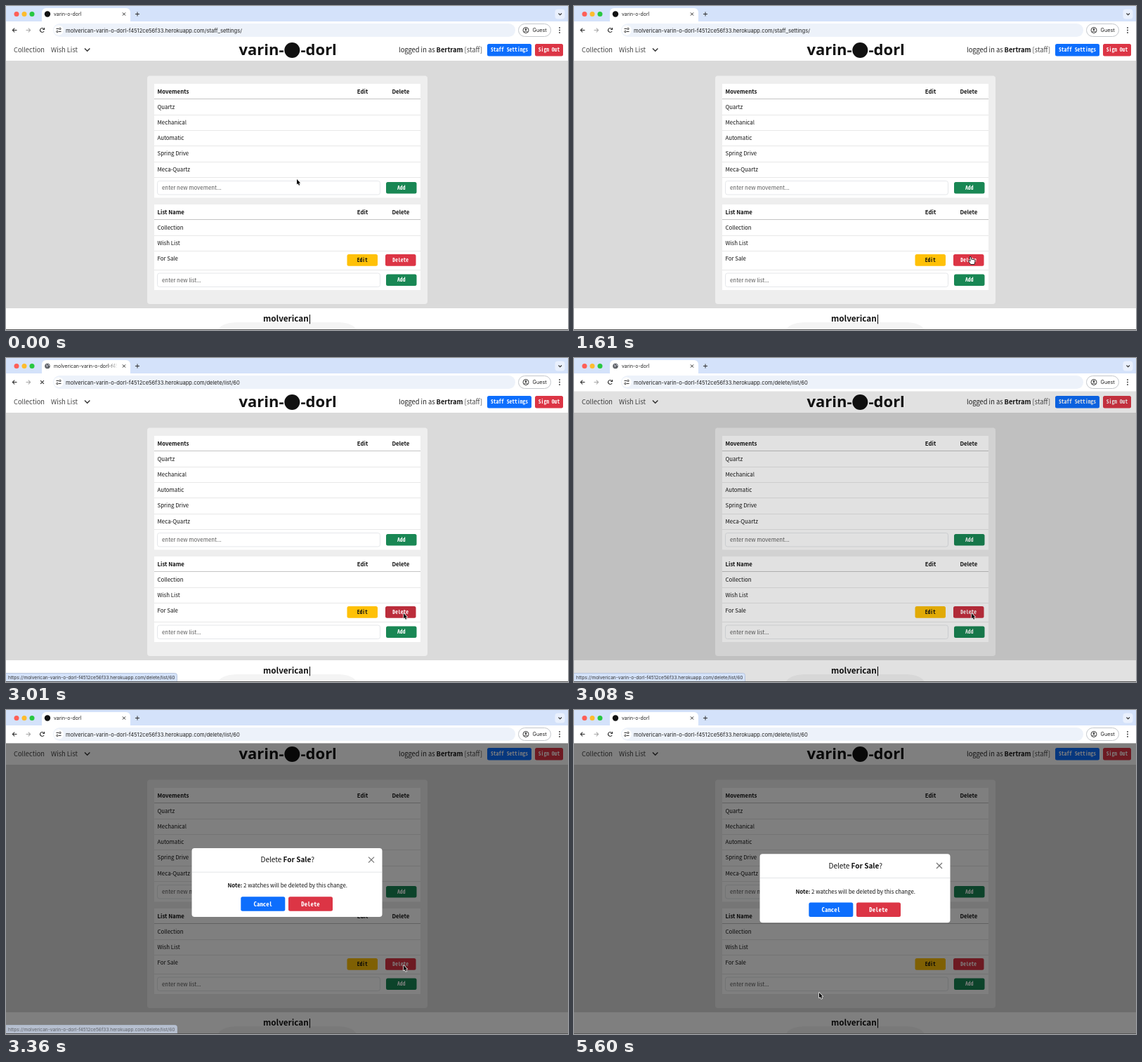
An HTML page with a canvas that plays this animation: 800x462 px, repeating every 6020 ms.

```html
<!DOCTYPE html>
<html lang="en">
<head>
<meta charset="utf-8">
<title>varin-o-dorl</title>
<style>
html, body { margin: 0; width: 100%; height: 100%; overflow: hidden; background: #fff; }
canvas { display: block; width: 800px; height: 462px; }
</style>
</head>
<body>
<canvas id="stage" width="800" height="462"></canvas>
<script>
const ctx = document.getElementById('stage').getContext('2d');
const LOOP = 6020, STEP = 70;
const SANS = '"Noto Sans CJK JP", "Noto Sans CJK SC", "Noto Sans CJK", "Open Sans", sans-serif';
const MONO = '"Noto Sans Mono CJK JP", "Noto Sans Mono CJK SC", "Noto Sans Mono", monospace';
const UI = 'Inter, Roboto, sans-serif';
const USER = 'molverican', SITE = 'varin-o-dorl';
const HOST = `${USER}-${SITE}-f4512ce56f33.herokuapp.com`;
const BLUE = '#0d6efd', RED = '#dc3545', GREEN = '#198754', YELLOW = '#ffc107';

// Moments of the story, in ms
const HOVER = 1540, STATUS_ON = 2030, CLICK = 2170, COMMIT = 2940, LOADED = 3045,
      MODAL = 3210, STATUS_OFF = 3290;

// Pointer way-points: time, x, y
const PATH = [[840, 414, 247], [1500, 563, 356], [1610, 565, 358], [1890, 566, 364],
  [4130, 566, 364], [5320, 342, 403], [5600, 349, 403]];

const clamp = v => Math.max(0, Math.min(1, v));
const ramp = (t, start, length) => clamp((t - start) / length);
const mix = (a, b, p) => a + (b - a) * p;
const smooth = p => p * p * (3 - 2 * p);
const easeOut = p => 1 - Math.pow(1 - p, 1.7);

function rect(x, y, w, h, fill) {
  ctx.fillStyle = fill;
  ctx.fillRect(x, y, w, h);
}

function round(x, y, w, h, r, fill, stroke) {
  ctx.beginPath();
  ctx.roundRect(x, y, w, h, r);
  if (fill) { ctx.fillStyle = fill; ctx.fill(); }
  if (stroke) { ctx.strokeStyle = stroke; ctx.lineWidth = 1; ctx.stroke(); }
}

function disc(x, y, r, fill) {
  ctx.beginPath();
  ctx.arc(x, y, r, 0, Math.PI * 2);
  ctx.fillStyle = fill;
  ctx.fill();
}

function line(points, color, width = 1) {
  ctx.beginPath();
  points.forEach(([x, y]) => ctx.lineTo(x, y));
  ctx.strokeStyle = color;
  ctx.lineWidth = width;
  ctx.stroke();
}

function arc(x, y, r, from, to, color, width) {
  ctx.beginPath();
  ctx.arc(x, y, r, from, to);
  ctx.strokeStyle = color;
  ctx.lineWidth = width;
  ctx.stroke();
}

function cross(x, y, r, color, width) {
  line([[x - r, y - r], [x + r, y + r]], color, width);
  line([[x + r, y - r], [x - r, y + r]], color, width);
}

function text(str, x, y, size, { font = SANS, weight = 400, color = '#111', align = 'left' } = {}) {
  ctx.font = `${weight} ${size}px ${font}`;
  ctx.textAlign = align;
  ctx.fillStyle = color;
  ctx.fillText(str, x, y);
  return x + ctx.measureText(str).width;
}

function button(label, x, y, w, h, fill, color = '#fff', size = 7.6) {
  round(x, y, w, h, 2.5, fill);
  text(label, x + w / 2, y + h / 2 + size * 0.35, size,
    { font: MONO, weight: 700, color, align: 'center' });
}

function drawTabs(t) {
  const loading = t >= CLICK && t < LOADED, committed = t >= COMMIT && t < LOADED;
  rect(0, 0, 800, 24, '#d4e2fa');
  ['#ff5f57', '#febc2e', '#28c840'].forEach((c, i) => disc(15 + i * 11, 11.5, 3.5, c));
  round(51, 3, 126, 24, 6, '#fff');

  if (loading && !committed) {
    const a = t / 150;
    arc(59, 11.5, 3.5, a, a + 4, '#1a73e8', 1.2);
  } else if (t >= COMMIT && t < MODAL) {
    disc(59, 11.5, 3.8, '#5f6368');
    line([[57, 9.5], [59, 11], [58, 13]], '#dde', 1);
    line([[60, 9], [62, 11]], '#dde', 1);
  } else {
    disc(59, 11.5, 4.2, '#111');
  }

  ctx.save();
  ctx.beginPath();
  ctx.rect(66, 4, 92, 16);
  ctx.clip();
  text(committed ? HOST : SITE, 68, 14, 6.9, { font: UI, color: '#222' });
  ctx.restore();
  if (committed) {
    const fade = ctx.createLinearGradient(146, 0, 159, 0);
    fade.addColorStop(0, '#fff0');
    fade.addColorStop(1, '#fff');
    rect(146, 5, 13, 14, fade);
  }
  cross(168, 11.5, 2.1, '#333', 1);
  line([[184, 11.5], [190, 11.5]], '#333');
  line([[187, 8.5], [187, 14.5]], '#333');
  round(781.5, 4.5, 14, 14, 4, '#e9f0fd');
  line([[786.5, 10.5], [788.7, 12.7], [791, 10.5]], '#333', 1.1);
}

function drawToolbar(t) {
  const loading = t >= CLICK && t < LOADED;
  rect(0, 22, 800, 25.5, '#fff');
  line([[15.5, 34.5], [9.5, 34.5]], '#333', 1.1);
  line([[12.2, 31.6], [9.3, 34.5], [12.2, 37.4]], '#333', 1.1);
  line([[28.5, 34.5], [34.5, 34.5]], '#aaa', 1.1);
  line([[31.8, 31.6], [34.7, 34.5], [31.8, 37.4]], '#aaa', 1.1);
  if (loading) {
    cross(51.5, 34.5, 2.4, '#333', 1.1);
  } else {
    arc(51.5, 34.5, 2.9, 0.5, 5.5, '#333', 1.1);
    line([[54.6, 31], [54.6, 33.4], [52.2, 33.4]], '#333', 1.1);
  }

  round(67, 25, 658, 19, 9.5, '#edf2fa');
  disc(75, 34.5, 7, '#fff');
  line([[71.5, 32.5], [75, 32.5]], '#333');
  line([[75, 36.5], [78.5, 36.5]], '#333');
  arc(77, 32.5, 1.2, 0, 7, '#333', 0.9);
  arc(73, 36.5, 1.2, 0, 7, '#333', 0.9);
  text(HOST + (t >= COMMIT ? '/delete/list/60' : '/staff_settings/'), 85, 37.5, 7.6,
    { font: UI, color: '#222' });

  round(729.5, 25.5, 46, 18, 9, '#fff', '#c4c7cc');
  arc(740, 34.5, 4, 0, 7, '#333', 1);
  disc(740, 33.2, 1.3, '#333');
  arc(740, 38, 2.4, 3.5, 5.9, '#333', 1);
  text('Guest', 749.5, 37.2, 7.3, { font: UI, color: '#222' });
  [31, 34.5, 38].forEach(y => disc(788, y, 0.9, '#333'));
}

function drawNav() {
  rect(0, 47.5, 800, 30.5, '#fff');
  const grey = { color: '#444' };
  text('Collection', 11, 66, 9.3, grey);
  text('Wish List', 64, 66, 9.3, grey);
  line([[112, 60.5], [115.7, 64.2], [119.4, 60.5]], '#333', 1.4);

  const mark = { font: '"Noto Sans", "Open Sans", sans-serif', weight: 700, color: '#111' };
  text('varin-', 395.5, 70, 22, { ...mark, align: 'right' });
  disc(407.3, 63, 11, '#111');
  text('-dorl', 419.5, 70, 22, mark);

  let x = text('logged in as ', 559, 66, 9.3, { color: '#222' });
  x = text('Bertram', x, 66, 9.3, { weight: 700 });
  text(' [staff]', x, 66, 9.3, grey);
  button('Staff Settings', 685, 54, 63, 17.5, BLUE);
  button('Sign Out', 753, 54, 40, 17.5, RED);
}

function drawTable(top, title, rows, rowTop, inputTop, hint, bottom) {
  const bold = { weight: 700 }, mid = { weight: 700, align: 'center' };
  rect(211, top, 379, bottom - top, '#fff');
  text(title, 215.5, top + 13.7, 7.85, bold);
  text('Edit', 507.5, top + 13.7, 7.85, mid);
  text('Delete', 561.8, top + 13.7, 7.85, mid);
  rect(211, top + 21, 379, 1, '#c4c4c4');
  rows.forEach((row, i) => {
    const y = rowTop + i * 22.3;
    text(row, 215.5, y + 2.8, 7.85);
    const last = i === rows.length - 1;
    rect(211, Math.round(last ? inputTop - 5 : y + 11), 379, 1, '#e8e8e8');
  });
  round(215.5, inputTop + 0.5, 317, 19.5, 3, '#fff', '#e5e7ea');
  text(hint, 222, inputTop + 13, 7.85, { color: '#5a5a5a' });
  button('Add', 541, inputTop + 2, 43.5, 16.5, GREEN);
}

function drawPage(t) {
  rect(0, 78, 800, 353, '#dadada');
  drawNav();
  round(201, 99.5, 399, 325.5, 4, '#eeeeee');
  drawTable(111, 'Movements', ['Quartz', 'Mechanical', 'Automatic', 'Spring Drive', 'Meca-Quartz'],
    143.7, 249, 'enter new movement...', 273.5);
  drawTable(283, 'List Name', ['Collection', 'Wish List', 'For Sale'],
    315.9, 380.5, 'enter new list...', 405);
  button('Edit', 485.5, 354, 43.5, 16.8, YELLOW, '#111');

  const hover = ramp(t, HOVER + 70, 150) * (1 - ramp(t, LOADED, 90));
  const tone = [[220, 187], [53, 45], [69, 59]].map(([a, b]) => mix(a, b, hover));
  button('Delete', 540, 354, 43.5, 16.8, `rgb(${tone})`);

  rect(0, 431, 800, 31, '#fff');
  ctx.beginPath();
  ctx.moveTo(302, 462);
  ctx.quadraticCurveTo(306, 452, 328, 451);
  ctx.lineTo(474, 451);
  ctx.quadraticCurveTo(494, 452, 499, 462);
  ctx.fillStyle = '#f4f4f4';
  ctx.fill();
  text(USER + '|', 400, 450.3, 11.7, { weight: 700, align: 'center' });
}

function drawModal(t) {
  if (t < MODAL) return;
  ctx.save();
  ctx.globalAlpha = ramp(t, MODAL, 150);
  ctx.translate(0, -27 * (1 - easeOut(ramp(t, MODAL, 300))));
  round(264.5, 205.3, 271, 98, 4, '#fff');
  rect(265, 239, 270, 1, '#e3e5e8');

  const parts = [['Delete ', 400], ['For Sale', 700], ['?', 400]];
  let x = 362.5;
  for (const [str, weight] of parts) x = text(str, x, 225.7, 10, { weight });
  cross(520, 222, 4, '#777', 1.2);
  x = text('Note:', 315.5, 261.8, 7.85, { weight: 700 });
  text(' 2 watches will be deleted by this change.', x, 261.8, 7.85);
  button('Cancel', 334.3, 274.5, 63, 20.5, BLUE, '#fff', 8.8);
  button('Delete', 402, 274.5, 63, 20.5, RED, '#fff', 8.8);
  ctx.restore();
}

function drawStatus(t) {
  if (t < STATUS_ON) return;
  ctx.save();
  ctx.globalAlpha = ramp(t, STATUS_ON - 70, 140) * (1 - ramp(t, STATUS_OFF, 200));
  round(-1, 449.5, 244.5, 13, [0, 3, 0, 0], '#d4e2fa', '#b9c6dc');
  text(`https://${HOST}/delete/list/60`, 3, 458.3, 6.6, { font: UI, color: '#333' });
  ctx.restore();
}

function pointerAt(t) {
  const i = PATH.findIndex(p => t < p[0]);
  if (i === 0) return PATH[0].slice(1);
  if (i < 0) return PATH[PATH.length - 1].slice(1);
  const [t0, x0, y0] = PATH[i - 1], [t1, x1, y1] = PATH[i];
  const p = smooth((t - t0) / (t1 - t0));
  return [mix(x0, x1, p), mix(y0, y1, p)];
}

function drawPointer(t) {
  const [x, y] = pointerAt(t);
  ctx.save();
  ctx.translate(x, y);
  ctx.lineJoin = 'round';
  if (t >= HOVER && t < COMMIT) {
    const hand = new Path2D('M-2 0Q-1-2 0 0L1 3.5Q2.2 2.4 3 3.6Q4.2 2.9 4.8 4Q6 3.8 6 5.2L5.6 8.2L4.8 10.5H-.2L-3.4 6.4Q-3.6 4.8-2 5.4L-.9 6Z');
    ctx.fillStyle = '#fff';
    ctx.strokeStyle = '#111';
    ctx.lineWidth = 0.9;
    ctx.fill(hand);
    ctx.stroke(hand);
  } else {
    const arrow = new Path2D('M0 0V7.4L1.7 5.9L2.9 8.8L4.2 8.3L3 5.4H5.2Z');
    ctx.strokeStyle = '#fff';
    ctx.lineWidth = 1.4;
    ctx.stroke(arrow);
    ctx.fillStyle = '#000';
    ctx.fill(arrow);
  }
  ctx.restore();
}

function draw(t) {
  drawTabs(t);
  drawToolbar(t);
  drawPage(t);
  rect(0, 47.5, 800, 415, `rgba(0,0,0,${0.5 * ramp(t, LOADED, 150)})`);
  drawModal(t);
  drawStatus(t);
  rect(0, 461, 800, 1, '#555');
  drawPointer(t);
}

function tick() {
  const t = performance.now() % LOOP;
  draw(Math.min(5600, Math.floor(t / STEP) * STEP));
  requestAnimationFrame(tick);
}
tick();
</script>
</body>
</html>
```
